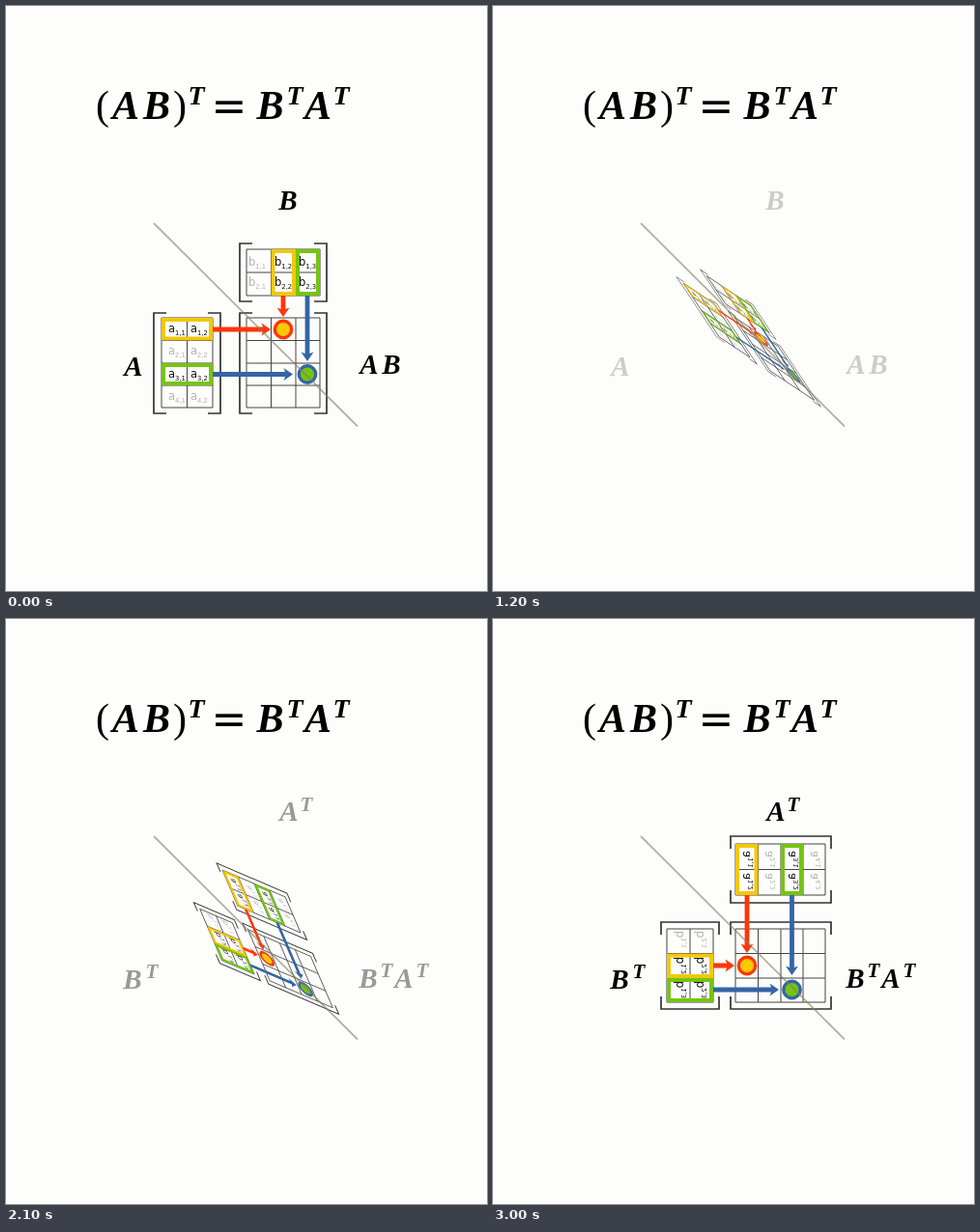
Write an HTML page that moves like this. It is 498 px wide and 606 px high and loops after 3300 ms.

```html
<!DOCTYPE html>
<html lang="en">
<head>
<meta charset="utf-8">
<title>Transpose of a product</title>
<style>
  html, body { margin: 0; height: 100%; overflow: hidden; background: #fdfdfb; }
  svg { display: block; }
  .math { font: italic bold 42px "Liberation Serif", serif; text-anchor: middle; }
  .math .upright { font-style: normal; font-weight: normal; }
  .math .equals { font: 44px "DejaVu Sans", sans-serif; }
  .cell { font: 11.5px "DejaVu Sans", sans-serif; }
  .cell tspan { font-size: 6.8px; }
</style>
</head>
<body>
<svg id="stage" width="498" height="606" viewBox="0 0 498 606"></svg>
<script>
const STEP = 300, HALF = 5, STEPS = 2 * HALF + 1;
const RED = '#ff3608', BLUE = '#3465a4', YELLOW = '#f2c80a', GREEN = '#76c412';
const ROWS = [323, 346.5, 370, 393, 416];

// Glyphs are [character, center x, baseline, size or class]
const math = glyphs => glyphs.map(([ch, x, y, style = 42]) =>
  `<text x="${x}" y="${y}" ${isNaN(style) ? `class="${style}"` : `style="font-size:${style}px"`}>${ch}</text>`).join('');

function grid(xs, ys) {
  const d = xs.map(x => `M${x} ${ys[0]}V${ys.at(-1)}`).join('') +
            ys.map(y => `M${xs[0]} ${y}H${xs.at(-1)}`).join('');
  return `<path d="${d}" fill="none" stroke="#444"/>`;
}

const brackets = (x1, y1, x2, y2) =>
  `<path d="M${x1 + 13} ${y1}H${x1}V${y2}h13M${x2 - 13} ${y1}H${x2}V${y2}h-13"
    fill="none" stroke="#333" stroke-width="1.7"/>`;

const frame = (x, y, w, h, color) =>
  `<rect x="${x + 2}" y="${y + 2}" width="${w - 4}" height="${h - 4}" fill="none" stroke="${color}" stroke-width="4"/>`;

const arrow = (x, y, length, angle, color) =>
  `<path transform="translate(${x} ${y}) rotate(${angle})" fill="${color}"
    d="M0-2.4H${length - 8}L${length - 9.5}-6.5L${length} 0L${length - 9.5} 6.5L${length - 8} 2.4H0z"/>`;

const dot = (x, y, fill, stroke) =>
  `<circle cx="${x}" cy="${y}" r="8.7" fill="${fill}" stroke="${stroke}" stroke-width="3.4"/>`;

const entry = (name, row, col, x, y, active) =>
  `<text class="cell" x="${x}" y="${y}" fill="${active ? '#111' : '#b3b3b0'}">${name}<tspan dy="3">${row},${col}</tspan></text>`;

function figure() {
  let cells = '';
  for (let row = 1; row <= 4; row++)
    for (let col = 1; col <= 2; col++)
      cells += entry('a', row, col, 145 + 23 * col, 314.7 + 23.3 * row, row % 2);
  for (let row = 1; row <= 2; row++)
    for (let col = 1; col <= 3; col++)
      cells += entry('b', row, col, [251, 278, 303][col - 1], 247 + 21.7 * row, col > 1);

  return grid([161, 187.5, 214], ROWS) + brackets(153, 318, 222, 422) +
    grid([249, 274.5, 300, 325], [252, 276, 300]) + brackets(242, 246, 332, 306) +
    grid([249, 274.5, 300, 325], ROWS) + brackets(242, 318, 332, 422) +
    frame(161, 323, 53, 23.5, YELLOW) + frame(161, 370, 53, 23, GREEN) +
    frame(274.5, 252, 25.5, 48, YELLOW) + frame(300, 252, 25, 48, GREEN) +
    cells +
    arrow(214, 335, 60, 0, RED) + arrow(287, 300, 22, 90, RED) +
    arrow(214, 381.5, 83, 0, BLUE) + arrow(312, 300, 68, 90, BLUE) +
    dot(287, 335, '#ffc80a', RED) + dot(312, 381.5, GREEN, BLUE);
}

const title = [
  ['(', 100, 117, 'upright'], ['A', 124, 117], ['B', 156, 117], [')', 180, 117, 'upright'],
  ['T', 197, 102, 28], ['=', 231, 119, 'equals'],
  ['B', 273.5, 117], ['T', 299, 102, 28], ['A', 323, 117], ['T', 347, 102, 28]
];
const before = [['B', 292, 211, 29], ['A', 132, 383, 29], ['A', 376, 381, 29], ['B', 399, 381, 29]];
const after = [
  ['A', 293, 209, 29], ['T', 311, 199, 21], ['B', 131, 383, 29], ['T', 151, 372, 21],
  ['B', 375, 382, 29], ['T', 394, 371, 21], ['A', 412, 382, 29], ['T', 431, 371, 21]
];

const stage = document.getElementById('stage');
stage.innerHTML = `<g class="math">${math(title)}</g>
  <g class="math" id="before">${math(before)}</g>
  <g class="math" id="after">${math(after)}</g>
  <g id="figure">${figure()}</g>
  <path d="M153 225L364 435.5" stroke="#808060" stroke-opacity=".6" stroke-width="1.8"/>`;
const [beforeLabels, afterLabels, matrices] =
  ['before', 'after', 'figure'].map(id => document.getElementById(id));

const show = (node, visible) => node.setAttribute('display', visible ? 'inline' : 'none');

function draw(now) {
  const step = Math.floor(now / STEP) % STEPS;

  // Flip across the line y = x + 72: distance from it scales from 1 to -1
  const scale = 1 - step / HALF;
  const keep = (1 + scale) / 2, swap = (1 - scale) / 2;
  matrices.setAttribute('transform',
    `matrix(${keep} ${swap} ${swap} ${keep} ${-72 * swap} ${72 * swap})`);
  show(matrices, step !== HALF);

  const gray = 51 * Math.min(step, 2 * HALF - step);
  const color = `rgb(${gray},${gray},${gray})`;
  beforeLabels.setAttribute('fill', color);
  afterLabels.setAttribute('fill', color);
  show(beforeLabels, step < HALF);
  show(afterLabels, step > HALF);

  requestAnimationFrame(draw);
}
draw(performance.now());
</script>
</body>
</html>
```
